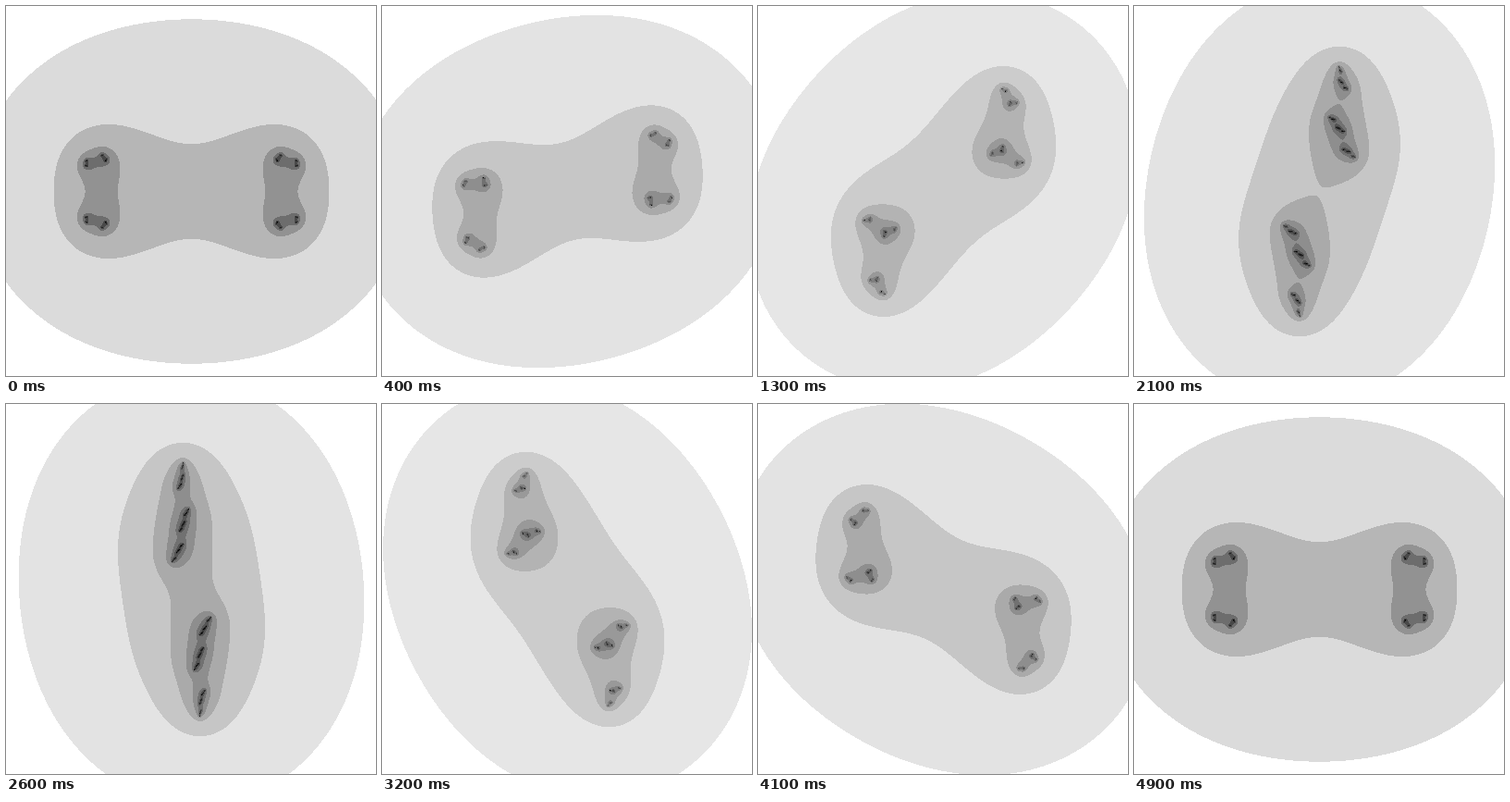
These frames come from a looping animation (400 px wide and 400 px high, 5 s). An HTML page with a canvas:

```html
<!DOCTYPE html>
<html lang="en">
<head>
<meta charset="utf-8">
<title>Julia sets</title>
<style>
  html, body { margin: 0; width: 100%; height: 100%; overflow: hidden; background: #fff; }
  canvas { display: block; width: 100vw; height: 100vh; image-rendering: pixelated; }
</style>
</head>
<body>
<canvas id="stage" width="400" height="400"></canvas>
<script>
const SIZE = 400, SPAN = 6, ESCAPE = 10, RADIUS = 2.2;
const STEPS = 50, STEP_MS = 100, MAX_ITER = 255;

const ctx = document.getElementById('stage').getContext('2d');
const image = ctx.createImageData(SIZE, SIZE);
const pixels = new Uint32Array(image.data.buffer);
const counts = new Uint8Array(SIZE * SIZE);

const coord = i => (i - SIZE / 2) * SPAN / SIZE;

// Number of iterations of z² + c before z escapes
function escapeTime(re, im, cRe, cIm) {
  let n = 0;
  while (n < MAX_ITER) {
    const next = re * re - im * im + cRe;
    im = 2 * re * im + cIm;
    re = next;
    if (re * re + im * im > ESCAPE * ESCAPE) break;
    n++;
  }
  return n;
}

// The real axis runs down the stage, the imaginary axis across it
function draw(step) {
  const angle = 2 * Math.PI * step / (STEPS - 1);
  const cRe = RADIUS * Math.cos(angle), cIm = RADIUS * Math.sin(angle);
  let max = 1;
  for (let y = 0, i = 0; y < SIZE; y++) {
    for (let x = 0; x < SIZE; x++, i++) {
      counts[i] = escapeTime(coord(y), coord(x), cRe, cIm);
      if (counts[i] > max) max = counts[i];
    }
  }
  // Greys are scaled to the deepest level of each picture
  for (let i = 0; i < counts.length; i++) {
    const grey = Math.round(255 * (1 - counts[i] / max));
    pixels[i] = (0xff000000 | grey * 0x010101) >>> 0;
  }
  ctx.putImageData(image, 0, 0);
}

const start = performance.now();
let shown = -1;

function tick() {
  const time = Math.max(0, performance.now() - start);
  const step = Math.floor(time / STEP_MS) % STEPS;
  if (step !== shown) draw(shown = step);
  requestAnimationFrame(tick);
}
tick();
</script>
</body>
</html>
```
